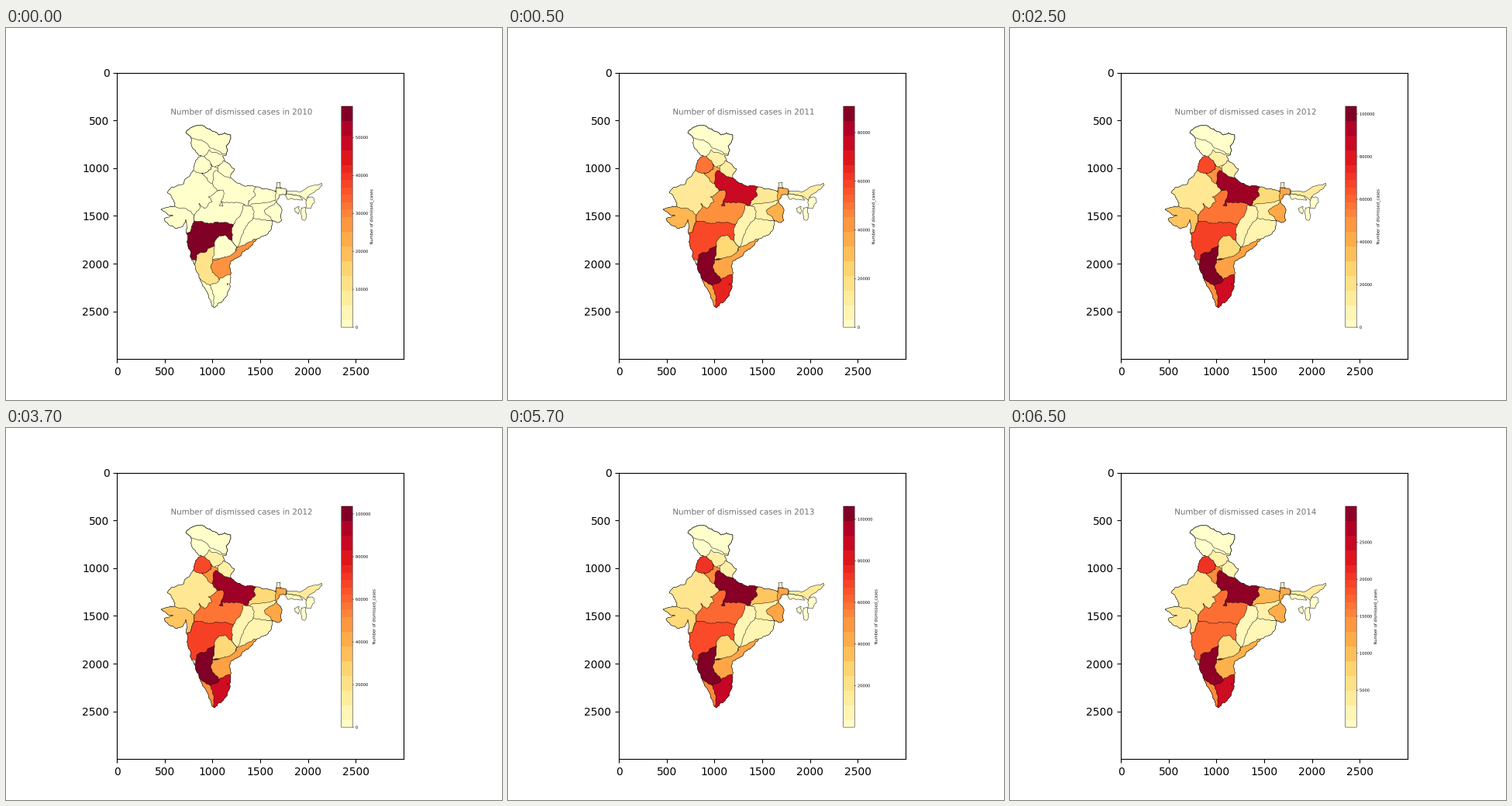
Write a matplotlib script that moves like this. It is 640 px wide and 480 px high and loops after 8 s.

```python
import math
import random

import matplotlib.pyplot as plt
from matplotlib.animation import FuncAnimation
from matplotlib.patches import Circle, PathPatch, Polygon, Rectangle
from matplotlib.textpath import TextPath
from matplotlib.transforms import Affine2D

FINE = 0.33                    # line width in points
SMALL, LARGE = 5.13, 10.27     # text heights in pixels
BAR_LEFT, BAR_RIGHT, BAR_TOP, BAR_BOTTOM = 432.7, 447.2, 101, 386.1
BAR_HEIGHT = BAR_BOTTOM - BAR_TOP
cmap = plt.get_cmap("YlOrRd")

fig = plt.figure(figsize=(6.4, 4.8), dpi=100, facecolor="white")
frame_ax = fig.add_subplot()
frame_ax.set_aspect("equal")
frame_ax.set_xlim(-0.5, 2999.5)
frame_ax.set_ylim(2999.5, -0.5)
frame_ax.set_xticks(range(0, 3000, 500))
frame_ax.set_yticks(range(0, 3000, 500))

ax = fig.add_axes([0, 0, 1, 1])
ax.set_xlim(0, 640)
ax.set_ylim(480, 0)
ax.axis("off")


def roughen(a, b):
    """Points from a up to b, displaced the same way from either side."""
    length = math.dist(a, b)
    if length < 2:
        return [a]
    lo, hi = sorted((a, b))
    shift = random.Random(f"{lo}{hi}").uniform(-1, 1) * min(0.16, 1.5 / length)
    mid = ((lo[0] + hi[0]) / 2 - (hi[1] - lo[1]) * shift,
           (lo[1] + hi[1]) / 2 + (hi[0] - lo[0]) * shift)
    return roughen(a, mid) + roughen(mid, b)


def rough_polygon(coords, **style):
    points = list(zip(coords[::2], coords[1::2]))
    border = []
    for a, b in zip(points, points[1:] + points[:1]):
        border += roughen(a, b)
    return ax.add_patch(Polygon(border, ec="black", lw=FINE, joinstyle="round",
                                **style))


# Mainland outline, clockwise from the north-west
mainland = rough_polygon((
    232, 135, 237, 130, 249, 126, 263, 130, 275, 138, 282, 135, 290, 138,
    290, 143, 284, 152, 286, 157, 284, 164, 279, 165, 282, 172, 295, 182,
    290, 193, 305, 203, 321, 205, 331, 208, 348, 212, 349, 206, 362, 209,
    361, 215, 353, 215, 349, 225, 355, 232, 356, 248, 350, 251, 343, 248,
    342, 260, 336, 267, 324, 272, 307, 288, 297, 297, 290, 301, 288, 307,
    290, 322, 286, 341, 280, 352, 274, 355, 269, 361, 265, 357, 258, 338,
    249, 322, 243, 305, 238, 293, 233, 265, 234, 258, 232, 247, 228, 256,
    220, 259, 212, 255, 204, 247, 216, 242, 209, 241, 200, 234, 212, 230,
    218, 230, 216, 222, 208, 212, 213, 206, 228, 202, 233, 194, 242, 183,
    247, 169, 252, 165, 245, 160, 239, 150, 239, 142), fc=cmap(0.0))

# Regions overlap: each one covers the loose edges of those before it.
regions = []


def region(name, first, last, *coords, inland=True):
    """Add a region whose level drifts from first (2011) to last (2014)."""
    patch = rough_polygon(coords)
    if inland:
        patch.set_clip_path(mainland)
    regions.append((patch, name, first, last))


region("Kashmir", 0, 0, 230, 142, 239, 142, 254, 146, 264, 155, 272, 158,
       282, 166, 256, 175, 230, 160)
region("Rajasthan", .15, .17, 200, 195, 245, 178, 275, 208, 275, 230,
       245, 245, 200, 234)
region("Gujarat", .36, .16, 195, 234, 212, 230, 232, 233, 243, 242, 243, 250,
       238, 263, 230, 268, 195, 262)
region("Himachal", .1, .1, 256, 166, 262, 157, 274, 162, 288, 164, 285, 176,
       262, 180)
region("Punjab", .55, .69, 240, 165, 256, 166, 264, 175, 265, 182, 253, 187,
       242, 184, 236, 180)
region("Haryana", .42, .5, 264, 175, 274, 182, 272, 202, 261, 198, 253, 187,
       265, 182)
region("Uttarakhand", .11, .08, 280, 171, 300, 178, 296, 200, 272, 190,
       273, 180)
region("Bihar", .16, .36, 316, 200, 352, 206, 352, 226, 313, 234)
region("Jharkhand", .09, .1, 313, 231, 320, 227, 340, 225, 352, 221, 350, 250,
       316, 250)
region("Bengal", .38, .4, 349, 200, 366, 205, 360, 250, 350, 256, 343, 248,
       333, 236, 346, 228, 349, 212)
region("Odisha", .08, .06, 316, 243, 327, 246, 343, 248, 352, 262, 330, 280,
       296, 290, 300, 262)
region("Maharashtra", .64, .57, 228, 264, 238, 263, 243, 249, 298, 250,
       296, 277, 285, 278, 270, 288, 252, 300, 230, 300)
region("Madhya", .49, .56, 273, 210, 283, 208, 285, 222, 310, 222, 306, 245,
       294, 253, 281, 251, 257, 252, 243, 249, 243, 241, 250, 233, 249, 226,
       256, 233, 266, 224, 261, 218)
region("Uttar", .83, .965, 270, 184, 283, 192, 292, 192, 325, 200, 319, 211,
       322, 216, 313, 223, 313, 231, 300, 225, 278, 224, 280, 230, 275, 229,
       281, 215, 280, 209, 273, 210, 266, 200, 267, 190)
region("Chhattisgarh", .08, .05, 307, 228, 318, 231, 320, 243, 312, 253,
       306, 265, 298, 283, 292, 276, 291, 263, 294, 253, 303, 240)
region("Karnataka", .985, .965, 246, 293, 258, 289, 270, 279, 274, 300,
       276, 328, 262, 338, 240, 325, 243, 305)
region("Goa", 0, 0, 238, 299, 245, 299, 243, 306)
region("Telangana", .25, .2, 270, 274, 275, 268, 283, 267, 292, 276, 298, 283,
       295, 296, 267, 299)
region("Andhra", .42, .38, 267, 299, 277, 297, 292, 292, 298, 283, 308, 280,
       324, 272, 330, 280, 296, 310, 294, 325, 276, 326, 266, 315, 264, 308)
region("Tamil", .73, .82, 263, 332, 272, 329, 276, 323, 295, 317, 292, 345,
       275, 366, 262, 362)
region("Kerala", .42, .5, 246, 320, 263, 332, 268, 348, 269, 364, 255, 360)

region("Sikkim", 0, 0, 349, 200, 354, 199, 355, 207, 349, 206, inland=False)
region("Assam", .13, .14, 362, 210, 383, 210, 394, 204, 407, 200, 408, 203,
       389, 218, 388, 224, 380, 217, 361, 215, inland=False)
region("Meghalaya", .02, .02, 361, 215, 380, 217, 383, 222, 363, 221,
       inland=False)
region("Manipur", 0, 0, 389, 219, 397, 219, 398, 225, 393, 233, 387, 232,
       inland=False)
region("Mizoram", 0, 0, 381, 232, 387, 232, 386, 248, 382, 247, inland=False)
region("Tripura", 0, 0, 372, 233, 378, 230, 377, 240, 373, 237, inland=False)

ax.add_patch(Polygon(mainland.get_xy(), fill=False, ec="black", lw=FINE))
ax.add_patch(Circle((286, 330.5), 0.9, color="#300008", lw=0))


def level(name, first, last, year):
    if year == 2010:
        return {"Maharashtra": 1, "Andhra": .48, "Karnataka": .19}.get(name, 0)
    progress = (year - 2011) / 3
    hump = 1 + 0.08 * math.sin(math.pi * progress)
    return min(1, (first + (last - first) * progress) * hump)


# Colour bar in steps, finer around the middle
steps = [*range(0, 9, 2), *range(9, 16), *range(17, 30, 2), 30]
bands = []
for top, bottom in zip(steps, steps[1:]):
    y = BAR_TOP + BAR_HEIGHT * top / 30
    bands.append(ax.add_patch(Rectangle(
        (BAR_LEFT, y), BAR_RIGHT - BAR_LEFT, BAR_HEIGHT * (bottom - top) / 30,
        fc=cmap(1 - (top + bottom) / 60), lw=0, antialiased=False)))
ax.add_patch(Rectangle((BAR_LEFT, BAR_TOP), BAR_RIGHT - BAR_LEFT, BAR_HEIGHT,
                       fill=False, ec="black", lw=FINE, snap=False))


def text(string, x, y, size, color="black", center=False, angle=0):
    path = TextPath((0, 0), string, size=size)
    box = path.get_extents()
    shift = -(box.x0 + box.x1) / 2 if center else 0
    place = Affine2D().translate(shift, 0).scale(1, -1).rotate_deg(-angle)
    return ax.add_patch(PathPatch(place.translate(x, y).transform_path(path),
                                  fc=color, lw=0))


def year_artists(year, highest, step, first=0):
    artists = [text(f"Number of dismissed cases in {year}", 304, 111.6, LARGE,
                    "#707070", center=True)]
    for value in range(first, highest, step):
        y = BAR_BOTTOM - BAR_HEIGHT * value / highest
        artists += ax.plot([BAR_RIGHT, BAR_RIGHT + 1.8], [y, y],
                           color="black", lw=FINE, snap=False)
        artists.append(text(str(value), 450.9, y + 1.9, SMALL))
    extra_digits = len(str(value)) - 5
    artists.append(text("Number of dismissed_cases", 473.2 + extra_digits * 3.26,
                        243.6, SMALL, center=True, angle=90))
    return artists


years = {2010: year_artists(2010, 58200, 10000),
         2011: year_artists(2011, 90800, 20000),
         2012: year_artists(2012, 103600, 20000),
         2013: year_artists(2013, 106200, 20000, first=20000),
         2014: year_artists(2014, 29860, 5000, first=5000)}


def update(tick):
    current = 2010 + (tick + 3) // 4
    for year, artists in years.items():
        for artist in artists:
            artist.set_visible(year == current)
    for patch, *data in regions:
        patch.set_facecolor(cmap(float(level(*data, current))))
    peak = max(level(*data, current) for _, *data in regions)
    bands[0].set_facecolor(cmap(float(peak)))
    return []


anim = FuncAnimation(fig, update, frames=16, interval=500, repeat=True)
plt.show()
```
